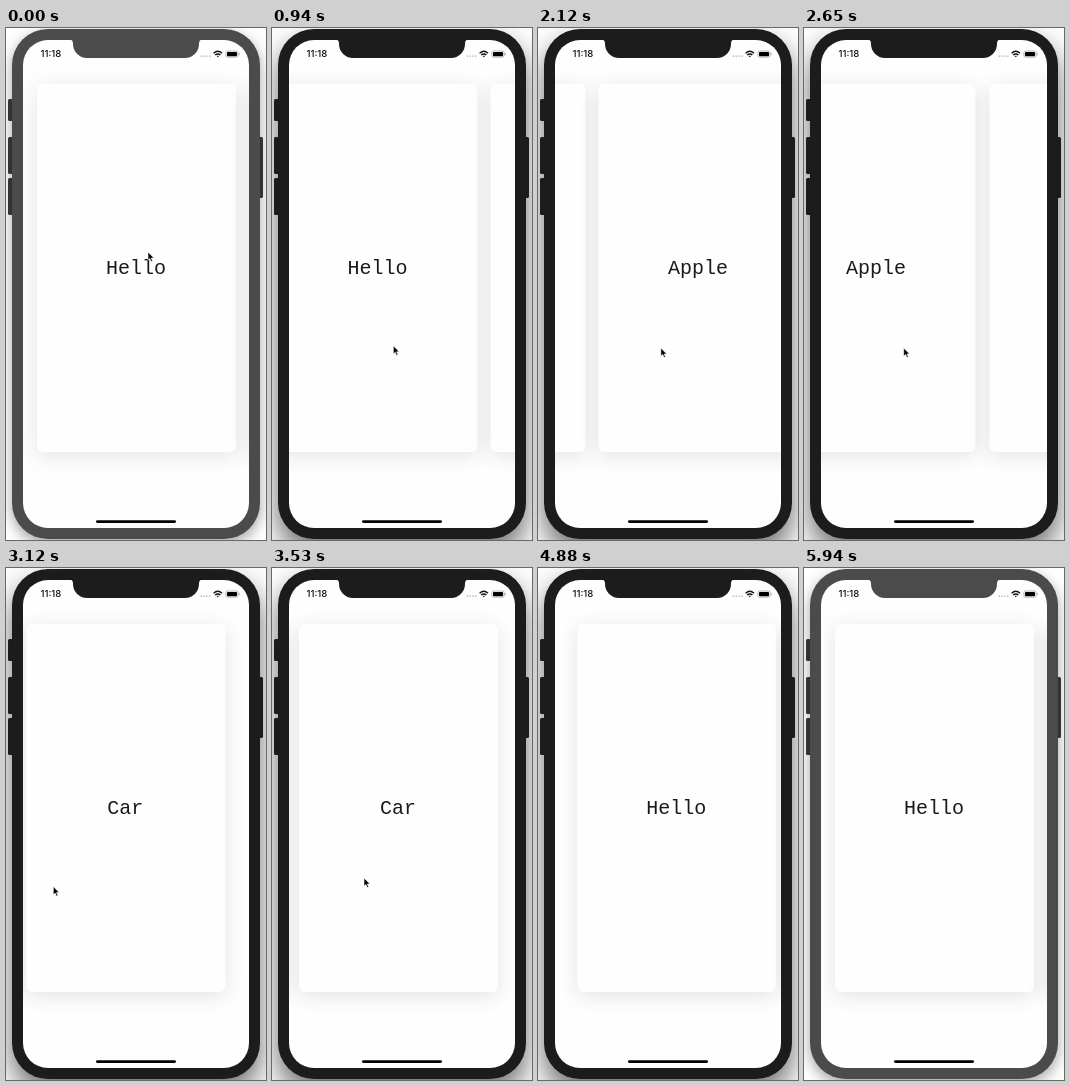
An HTML page for the animation above (6.94 s loop, 260 by 512 pixels).

```html
<!DOCTYPE html>
<html lang="en">
<head>
<meta charset="utf-8">
<title>Card carousel</title>
<style>
  html, body { margin: 0; width: 100%; height: 100%; overflow: hidden; background: #fefefe; }
  #stage { position: absolute; left: 0; top: 0; width: 260px; height: 512px; overflow: hidden; --case: #4b4b4b; --key: #3c3c3c; }
  #stage.active { --case: #1c1c1c; --key: #262626; }
  #phone, #screen, .key, .card, #track, svg { position: absolute; }
  #phone { left: 6px; top: 1px; width: 248px; height: 510px; border-radius: 36px; background: var(--case); box-shadow: 0 5px 14px rgba(0, 0, 0, .36); }
  .active #phone { box-shadow: 0 14px 28px rgba(0, 0, 0, .58); }
  .key { left: 2.2px; width: 5px; height: 37px; border-radius: 1.5px; background: var(--key); }
  #screen { left: 17px; top: 12px; width: 226px; height: 488px; border-radius: 25px; overflow: hidden; background: #fefefe; }
  .card {
    top: 44px; width: 199px; height: 368px; border-radius: 6px; background: #fefefe;
    box-shadow: 0 4px 20px rgba(40, 50, 70, .13);
    font: 20px/369px "Liberation Mono", monospace; text-align: center; color: #1a1a1a;
  }
  svg { left: 0; top: 0; }
</style>
</head>
<body>
<div id="stage">
  <div class="key" style="top:71px;height:22px"></div>
  <div class="key" style="top:109px"></div>
  <div class="key" style="top:150px"></div>
  <div class="key" style="left:251.6px;top:109px;height:61px"></div>
  <div id="phone"></div>
  <div id="screen"><div id="track"></div></div>
  <svg width="260" height="512">
    <path d="M63 11.5a4 4 0 0 1 4 4a14 14 0 0 0 14 14.5H179a14 14 0 0 0 14-14.5a4 4 0 0 1 4-4z" fill="var(--case)"/>
    <text x="34.5" y="29.4" font-family="Inter, sans-serif" font-size="9.6" font-weight="500" fill="#111">11:18</text>
    <path d="M194.7 28.2h10" stroke="#aaa" stroke-width="1.3" stroke-dasharray="1.4 1.4"/>
    <g fill="none" stroke="#111" stroke-width="1.4">
      <path d="M207.6 25.2q4.2-3.8 8.4 0M209.2 27q2.6-2.2 5.2 0"/>
      <path d="M211.8 29.3l-1.2-1.2q1.2-.9 2.4 0z" fill="#111" stroke="none"/>
      <rect x="219.9" y="23" width="12.2" height="6.2" rx="1.7" stroke="#999" stroke-width=".7"/>
      <path d="M233.2 25v2.2" stroke="#999" stroke-width=".8"/>
    </g>
    <rect x="221" y="24" width="10" height="4.2" rx=".8" fill="#000"/>
    <rect x="90" y="492.2" width="80" height="2.8" rx="1.4" fill="#000"/>
    <path id="cursor" d="M0 0V8.2L1.9 6.5L3.2 9.6L4.6 9L3.3 6H5.9Z" fill="#000" stroke="#fff" stroke-width=".6"/>
  </svg>
</div>
<script>
const LOOP = 6940, FPS = 17, PITCH = 212.5;
const WORDS = ["Hello", "Country", "Summer", "Apple", "Car"];
const $ = id => document.getElementById(id);
const stage = $("stage"), track = $("track"), cursor = $("cursor");

WORDS.forEach((word, i) => {
  const card = document.createElement("div");
  card.className = "card";
  card.style.left = 13.5 + i * PITCH + "px";
  card.textContent = word;
  track.append(card);
});

// Two swipes forward and one back; each end bounces a little.
const SWIPES = [
  { from: 757, to: 2323, pages: 3 },
  { from: 2470, to: 3000, pages: 1.05 },
  { from: 3150, to: 3800, pages: -.05 },
  { from: 4150, to: 4800, pages: -4.045 },
  { from: 4790, to: 5180, pages: .045 }
];

// The pointer drags along with each swipe, then returns for the next one.
const MOVES = [
  { from: 235, to: 530, x: 46, y: 92 },
  { from: 760, to: 1148, x: -148, y: 4 },
  { from: 1600, to: 2400, x: 116, y: 0 },
  { from: 2500, to: 2800, x: -116, y: 0 },
  { from: 3000, to: 3500, x: 52, y: -10 },
  { from: 4150, to: 4500, x: 90, y: 6 },
  { from: 4600, to: 5350, x: -51, y: 78 },
  { from: 5350, to: 5530, x: 127, y: 118 }
];

function ease(t, from, to) {
  const u = Math.min(1, Math.max(0, (t - from) / (to - from)));
  return u * u * (3 - 2 * u);
}

const travel = (steps, key, t) =>
  steps.reduce((sum, s) => sum + s[key] * ease(t, s.from, s.to), 0);

function draw(now) {
  const raw = now % LOOP;
  const t = Math.floor((raw + 6) * FPS / 1000) * 1000 / FPS;
  stage.classList.toggle("active", raw >= 60 && raw < 5940);
  track.style.transform = `translateX(${-PITCH * travel(SWIPES, "pages", t)}px)`;

  const x = 142 + travel(MOVES, "x", t), y = 224 + travel(MOVES, "y", t);
  cursor.setAttribute("transform", `translate(${x} ${y})`);
  cursor.style.display = t < 4600 || t > 5340 && t < 5520 ? "" : "none";
}

function tick() {
  draw(performance.now());
  requestAnimationFrame(tick);
}
tick();
</script>
</body>
</html>
```
